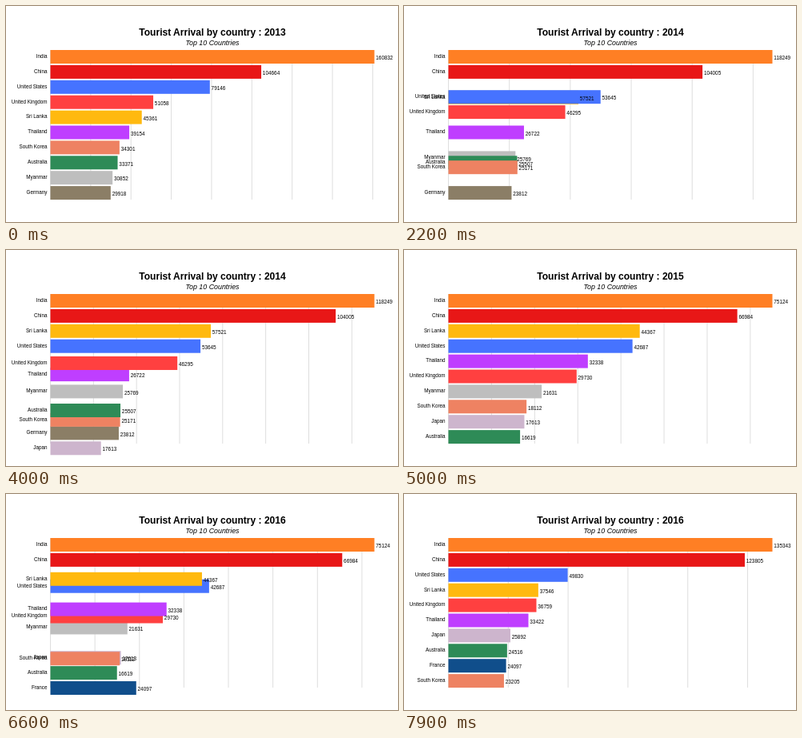
An HTML page that plays this animation: 490 px wide and 270 px high, repeating every 8000 ms.

```html
<!DOCTYPE html>
<html lang="en">
<head>
<meta charset="utf-8">
<title>Tourist Arrival by country</title>
<style>
  html, body { margin: 0; width: 100%; height: 100%; overflow: hidden; background: #fff; }
  svg { display: block; width: 100vw; height: 100vh; }
  text { font-family: "Liberation Sans", Arial, sans-serif; fill: #000; }
  #title { font-size: 12.05px; font-weight: bold; text-anchor: middle; }
  #sub { font-size: 8.85px; font-style: italic; text-anchor: middle; }
  #names { font-size: 6.3px; text-anchor: end; }
  #values { font-size: 6.4px; }
  #grid { stroke: #dedede; stroke-width: 1; fill: none; }
</style>
</head>
<body>
<svg viewBox="0 0 490 270" xmlns="http://www.w3.org/2000/svg">
  <rect width="490" height="270" fill="#fff"/>
  <path id="grid"/>
  <g id="bars"></g>
  <g id="names"></g>
  <g id="values"></g>
  <text id="title" x="258" y="37.2"></text>
  <text id="sub" x="258" y="49.4">Top 10 Countries</text>
</svg>
<script>
const LOOP = 8000, TICK = 100;
const LEFT = 55.5, SPAN = 405, TOP = 63.5, PITCH = 18.9, BAR = 17;
const DRIFT = 2; // rows travelled when entering or leaving
const FIRST_YEAR = 2013;

// name, colour, arrivals per year (0 = outside the top ten)
const countries = [
  ["India", "#ff7f24", 160832, 118249, 75124, 135343],
  ["China", "#e81717", 104664, 104005, 66984, 123805],
  ["United States", "#4673ff", 79146, 53645, 42687, 49830],
  ["United Kingdom", "#ff4040", 51058, 46295, 29730, 36759],
  ["Sri Lanka", "#ffb90f", 45361, 57521, 44367, 37546],
  ["Thailand", "#bf3eff", 39154, 26722, 32338, 33422],
  ["South Korea", "#ee8262", 34301, 25171, 18112, 23205],
  ["Australia", "#2e8b57", 33371, 25507, 16619, 24516],
  ["Myanmar", "#bebebe", 30852, 25769, 21631, 0],
  ["Germany", "#8b7e66", 29918, 23812, 0, 0],
  ["Japan", "#cdb5cd", 0, 0, 17613, 25892],
  ["France", "#104e8b", 0, 0, 0, 24097]
].map(([name, color, ...values]) => ({ name, color, values, ranks: [] }));

// start and length of each change of year, in steps
const moves = [[4.1, 16], [25, 16], [44.1, 17]];

const $ = id => document.getElementById(id);
const mix = (a, b, p) => a + (b - a) * p;

function add(parent, tag, attrs) {
  const el = document.createElementNS("http://www.w3.org/2000/svg", tag);
  for (const key in attrs) el.setAttribute(key, attrs[key]);
  return $(parent).appendChild(el);
}

for (let y = 0; y <= moves.length; y++) {
  countries.filter(c => c.values[y])
    .sort((a, b) => b.values[y] - a.values[y])
    .forEach((c, i) => c.ranks[y] = i);
}

for (const c of countries) {
  c.bar = add("bars", "rect", { x: LEFT, height: BAR, fill: c.color });
  c.label = add("names", "text", { x: 51.5 });
  c.label.textContent = c.name;
  c.value = add("values", "text", {});
}

function gridStep(max) {
  if (max > 150000) return 20000;
  if (max > 125000) return 25000;
  if (max > 105000) return 15000;
  return max > 85000 ? 12500 : 10000;
}

function drawGrid(max) {
  const step = gridStep(max);
  let d = "";
  for (let v = 0; v <= max; v += step) {
    d += `M${(LEFT + v / max * SPAN).toFixed(2)} 55V242`;
  }
  $("grid").setAttribute("d", d);
}

// Bars are stacked by the rank they move to; leaving bars lie at the back.
function restack(year) {
  const key = c => c.ranks[year + 1] ?? -1;
  [...countries].sort((a, b) => key(a) - key(b)).forEach(c => {
    $("bars").append(c.bar);
    $("names").append(c.label);
    $("values").append(c.value);
  });
}

function drawCountry(c, year, t, p, max) {
  const from = c.values[year], to = c.values[year + 1];
  const shown = (from && to) || (from && t < 1) || (to && t > 0);
  for (const el of [c.bar, c.label, c.value]) {
    el.setAttribute("visibility", shown ? "visible" : "hidden");
  }
  if (!shown) return;

  const a = from || to, b = to || from;
  const r0 = from ? c.ranks[year] : c.ranks[year + 1] + DRIFT;
  const r1 = to ? c.ranks[year + 1] : c.ranks[year] - DRIFT;
  const y = TOP + PITCH * mix(r0, r1, p);
  const width = mix(a, b, p) / max * SPAN;

  c.bar.setAttribute("y", y - BAR / 2);
  c.bar.setAttribute("width", width);
  c.label.setAttribute("y", y + 1.3);
  c.value.setAttribute("x", LEFT + width + 1.8);
  c.value.setAttribute("y", y + 3.7);
  c.value.textContent = p > 0.5 ? b : a;
}

let stacked = -1, last = -1;

function draw(ms) {
  const n = Math.floor(ms % LOOP / TICK);
  if (n === last) return;
  last = n;
  const step = n - Math.floor((n + 3) / 6); // every sixth tick holds
  const year = Math.max(0, moves.filter(m => step >= m[0]).length - 1);
  const [start, length] = moves[year];
  const t = Math.min(1, Math.max(0, (step - start) / length));
  const p = t ** 3;
  const lead = countries[0].values;
  const max = mix(lead[year], lead[year + 1], p);

  if (stacked !== year) restack(stacked = year);
  drawGrid(max);
  for (const c of countries) drawCountry(c, year, t, p, max);
  $("title").textContent =
    `Tourist Arrival by country : ${FIRST_YEAR + year + (t > 0.5 ? 1 : 0)}`;
}

const begin = performance.now();
function loop() {
  draw(performance.now() - begin);
  requestAnimationFrame(loop);
}
loop();
</script>
</body>
</html>
```
